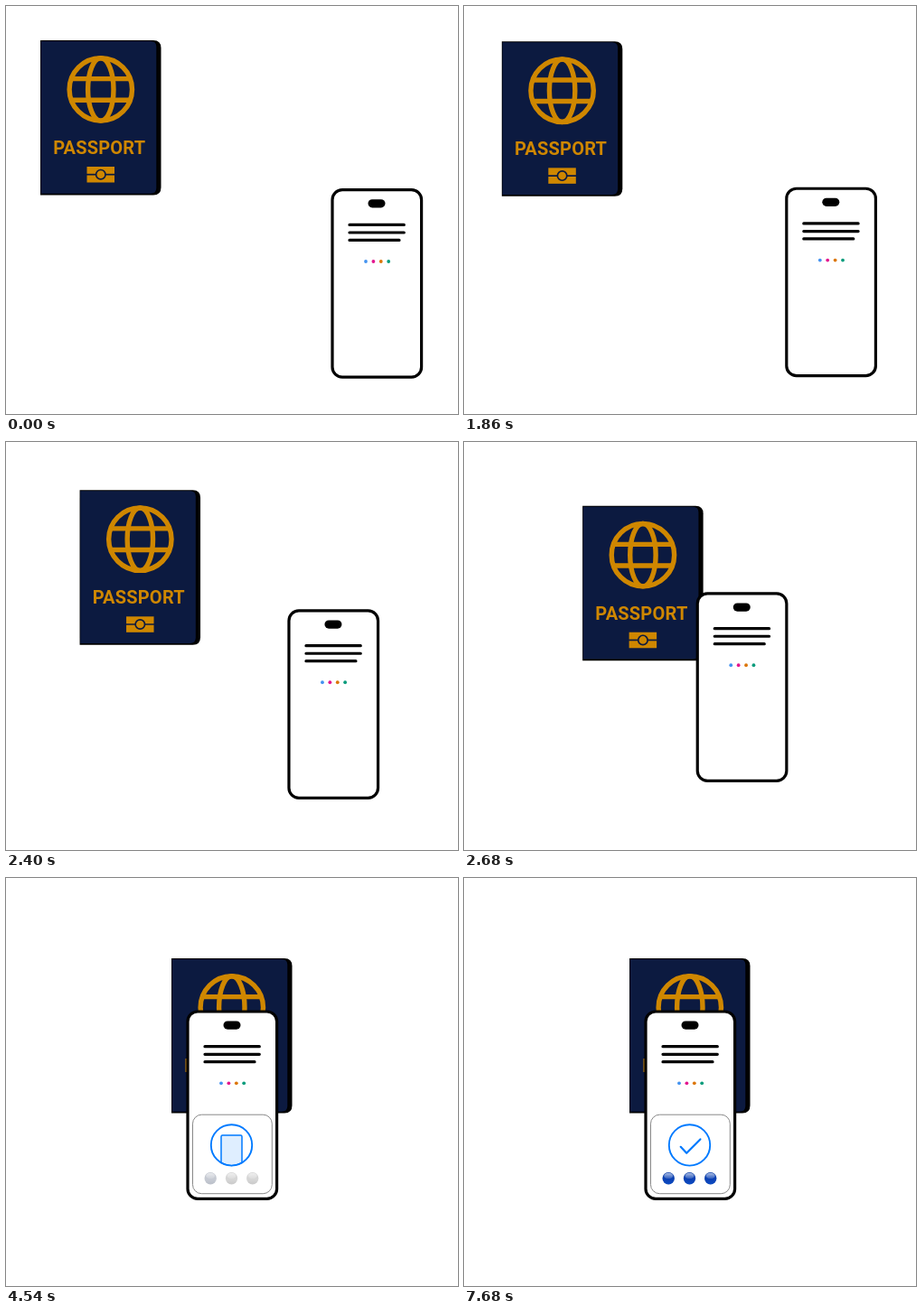
Recreate the animation shown at these times as an HTML page. Size 500x452 px, loop 8 s.

```html
<!DOCTYPE html>
<html lang="en">
<head>
<meta charset="utf-8">
<title>Passport scan</title>
<style>
html, body { margin: 0; width: 100%; height: 100%; overflow: hidden; background: #fff; }
svg { display: block; width: 500px; height: 452px; }
text { font: 700 20px Roboto, "Open Sans", sans-serif; letter-spacing: .2px; }
</style>
</head>
<body>
<svg viewBox="0 0 500 452" fill="none">
  <defs>
    <linearGradient id="grey" x2="0" y2="1">
      <stop stop-color="#d2d2d2"/><stop offset=".6" stop-color="#d6d6d6"/><stop offset="1" stop-color="#cacaca"/>
    </linearGradient>
    <linearGradient id="blue" x2="0" y2="1">
      <stop stop-color="#0a3fae"/><stop offset=".6" stop-color="#0b41b4"/><stop offset="1" stop-color="#0d4cc4"/>
    </linearGradient>
    <linearGradient id="shine" x2="0" y2="1">
      <stop stop-color="#fff" stop-opacity=".65"/><stop offset="1" stop-color="#fff" stop-opacity=".15"/>
    </linearGradient>
  </defs>

  <g id="passport">
    <path fill="#000" d="M38 38H163Q171.5 38 171.5 46.500V201Q171.500 209.500 163 209.500H38Z"/>
    <path fill="#0c1a40" d="M38.700 38.900H160Q166.300 38.900 166.300 45V201.500Q166.300 207.700 160 207.700H38.700Z"/>
    <g stroke="#cf8700" stroke-width="5.400">
      <circle cx="104.800" cy="92.400" r="34.700"/>
      <ellipse cx="104.800" cy="92.400" rx="14.200" ry="34.700"/>
      <path d="M72 80.600H137.600M72 104.200H137.600"/>
    </g>
    <text x="52.200" y="164" fill="#cf8700">PASSPORT</text>
    <path fill="#cf8700" d="M89.500 178H120V195.500H89.500Z"/>
    <g stroke="#0c1a40" stroke-width="1.700">
      <path d="M89 186.700H120.500"/>
      <circle cx="104.800" cy="186.700" r="5.200" fill="#cf8700"/>
    </g>
  </g>

  <g id="phone">
    <rect x="361" y="203.700" width="98.600" height="207.400" rx="11" fill="#fff" stroke="#000" stroke-width="3.200"/>
    <rect x="400.500" y="214.200" width="19" height="9.200" rx="4.600" fill="#000"/>
    <path d="M380 242.400H440.300M380 251H440.300M380 259.400H435" stroke="#000" stroke-width="3.200" stroke-linecap="round"/>
    <circle cx="398" cy="283" r="1.900" fill="#4493f0"/>
    <circle cx="406.400" cy="283" r="1.900" fill="#e3178f"/>
    <circle cx="414.800" cy="283" r="1.900" fill="#dc7608"/>
    <circle cx="423.200" cy="283" r="1.900" fill="#0a9c7c"/>
  </g>

  <g id="panel">
    <rect x="206.500" y="262.200" width="87.800" height="87.500" rx="10" fill="#fff" stroke="#888"/>
    <g stroke="#007aff">
      <path id="card" fill="#dfeeff" stroke-width="1.500" d="M238 315.400V286.600Q238 285.100 239.500 285.100H259.500Q261 285.100 261 286.600V315.400A22.700 22.700 0 0 1 238 315.400"/>
      <circle cx="249.500" cy="295.900" r="22.700" stroke-width="1.900"/>
      <path id="tick" stroke-width="2.200" stroke-linecap="round" stroke-linejoin="round" d="M239.700 297.800L246.200 304.800L261.400 289.400"/>
    </g>
    <g id="lights"></g>
  </g>
</svg>
<script>
const LOOP = 8000;
const $ = id => document.getElementById(id);
const ramp = (t, from, to) => Math.min(1, Math.max(0, (t - from) / (to - from)));
const move = (id, x, y) => $(id).setAttribute("transform", `translate(${x} ${y})`);

const ball = (x, fill) => `<g class="${fill}"><circle cx="${x}" cy="332.700" r="6.700" fill="url(#${fill})"/>
  <ellipse cx="${x}" cy="329.900" rx="5" ry="3.200" fill="url(#shine)"/></g>`;
$("lights").innerHTML = [226.2, 249.5, 272.7].map(x => ball(x, "grey") + ball(x, "blue")).join("");
const blues = document.querySelectorAll(".blue");

function draw(t) {
  const p = ramp(t, 1430, 2880) ** 3;
  move("passport", 145 * p, 51 * p);
  move("phone", -160 * p, -55.7 * p);
  $("panel").style.display = t < 3840 ? "none" : "";

  // three lights, then the tick, each 960 ms after the last
  const fade = i => ramp(t, 4520 + 960 * i, 4800 + 960 * i);
  blues.forEach((b, i) => b.style.opacity = fade(i));
  $("tick").style.opacity = fade(3);
  $("card").style.opacity = 1 - fade(3);
}

const start = performance.now();
function tick() {
  draw((performance.now() - start) % LOOP);
  requestAnimationFrame(tick);
}
tick();
</script>
</body>
</html>
```
